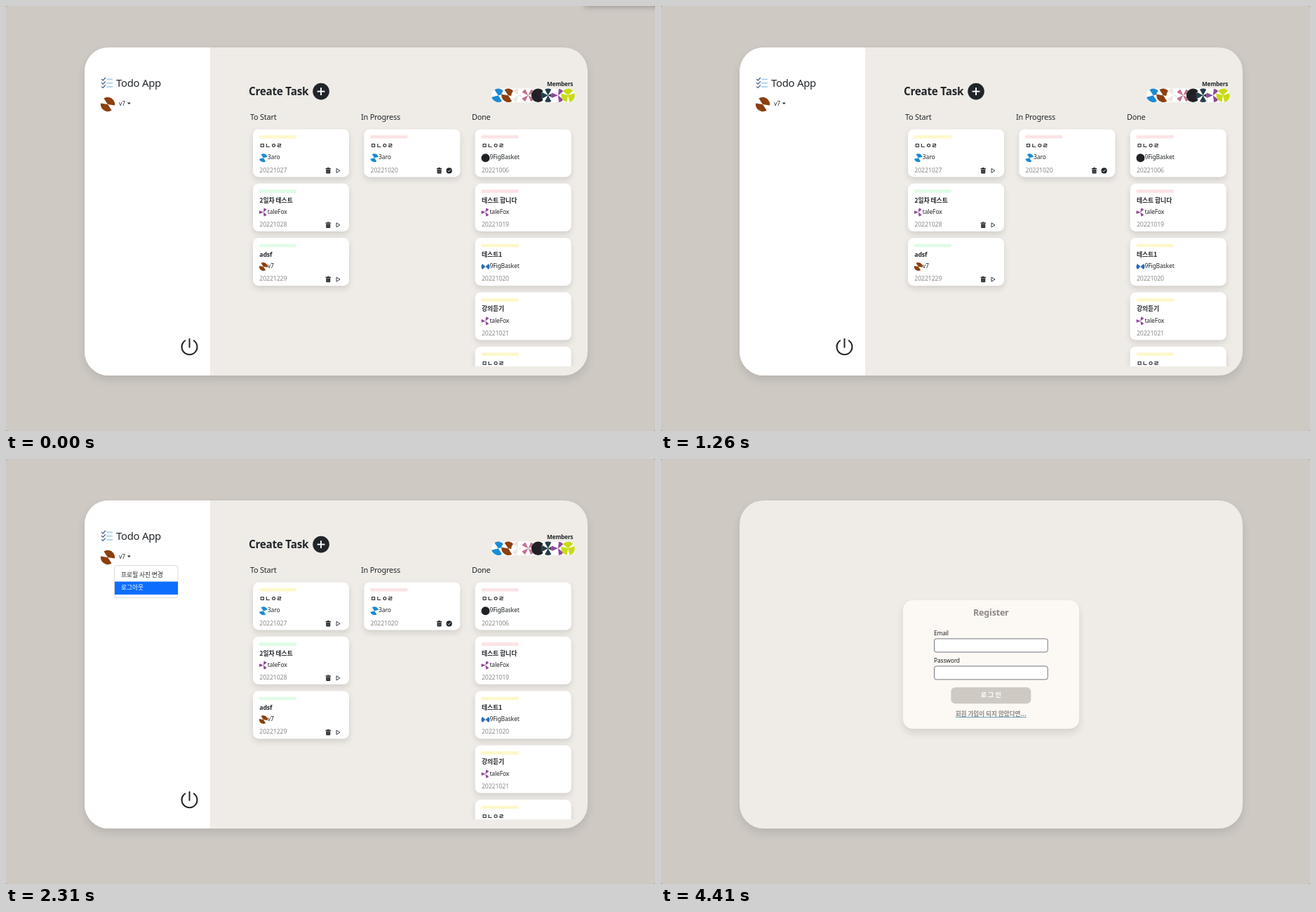
Recreate the animation shown at these times as an HTML page with a canvas. Size 925x605 px, loop 4620 ms.

```html
<!DOCTYPE html>
<html lang="ko">
<head>
<meta charset="utf-8">
<title>Todo App</title>
<style>
  html, body { margin: 0; width: 100%; height: 100%; overflow: hidden; background: #cec9c3; }
  canvas { display: block; width: 925px; height: 605px; }
</style>
</head>
<body>
<canvas id="stage" width="925" height="605"></canvas>
<script>
const ctx = document.getElementById('stage').getContext('2d');
const LOOP = 4620;
const TIMES = { shadowOff: 1260, menuOpen: 1750, hover: 2030, press: 2310, login: 2450 };
const LATIN = '"Noto Sans", "Noto Sans CJK KR", sans-serif';
const HANGUL = '"Noto Sans CJK KR", "Noto Sans", sans-serif';
const INK = '#212529', GREY = '#8c8986', STONE = '#cec9c3';
const YELLOW = '#fdf8c9', MINT = '#dffbe7', PINK = '#fce3e5';

function text(str, x, y, size, { weight = 400, color = INK, align = 'left' } = {}) {
  const korean = /[\u3131-\uD79D]/.test(str);
  ctx.font = `${weight} ${size}px ${korean ? HANGUL : LATIN}`;
  ctx.letterSpacing = korean ? '0px' : `${-0.015 * size}px`;
  ctx.textAlign = align;
  ctx.fillStyle = color;
  ctx.fillText(str, x, y);
}

function box(x, y, w, h, r, fill, stroke) {
  ctx.beginPath();
  ctx.roundRect(x, y, w, h, r);
  ctx.fillStyle = fill;
  ctx.fill();
  if (stroke) {
    ctx.strokeStyle = stroke;
    ctx.lineWidth = 1;
    ctx.stroke();
  }
}

function shadowBox(x, y, w, h, r, fill, dy, blur, alpha) {
  ctx.save();
  ctx.shadowColor = `rgba(0,0,0,${alpha})`;
  ctx.shadowOffsetY = dy;
  ctx.shadowBlur = blur;
  box(x, y, w, h, r, fill);
  ctx.restore();
}

function disc(x, y, r, fill) {
  ctx.beginPath();
  ctx.arc(x, y, r, 0, Math.PI * 2);
  ctx.fillStyle = fill;
  ctx.fill();
}

function path(points, close) {
  ctx.beginPath();
  points.forEach(([x, y]) => ctx.lineTo(x, y));
  if (close) ctx.closePath();
}

function line(points, color, width) {
  path(points);
  ctx.strokeStyle = color;
  ctx.lineWidth = width;
  ctx.stroke();
}

// Every avatar is a white disc with evenly turned coloured sectors.
const AVATARS = {
  blue: { color: '#1c8bd3', count: 2, turn: -1.2, span: 1.9 },
  brown: { color: '#8d3f0d', count: 2, turn: -1, span: 2.3 },
  pale: { color: '#ece7e4', count: 3, turn: -2, span: .8 },
  mauve: { color: '#c5708d', count: 4, turn: .8, span: .7 },
  black: { color: '#202124', count: 1, turn: 0, span: 2 * Math.PI },
  teal: { color: '#263c49', count: 4, turn: 0, span: 1 },
  purple: { color: '#91479b', count: 3, turn: Math.PI, span: .8 },
  lime: { color: '#c8db16', count: 3, turn: .5, span: 1.7 },
  bowtie: { color: '#2b6cb5', count: 2, turn: 0, span: 1.5 }
};

function avatar(kind, x, y, r) {
  const { color, count, turn, span } = AVATARS[kind];
  disc(x, y, r, '#fff');
  ctx.fillStyle = color;
  for (let i = 0; i < count; i++) {
    const angle = turn + i * 2 * Math.PI / count;
    ctx.beginPath();
    ctx.moveTo(x, y);
    ctx.arc(x, y, r, angle - span / 2, angle + span / 2);
    ctx.fill();
  }
}

function trash(x, y) {
  ctx.fillStyle = INK;
  ctx.fillRect(x - 3.7, y - 3.4, 7.4, 1.4);
  ctx.fillRect(x - 1.5, y - 4.3, 3, 1);
  box(x - 3, y - 1.5, 6, 5.7, [0, 0, 1, 1], INK);
  for (const dx of [-1, 1]) line([[x + dx, y - .8], [x + dx, y + 3.3]], '#aaa', .5);
}

function playIcon(x, y) {
  path([[x - 2.3, y - 3], [x + 2.7, y], [x - 2.3, y + 3]], true);
  ctx.strokeStyle = INK;
  ctx.lineWidth = .9;
  ctx.stroke();
}

function checkIcon(x, y) {
  disc(x, y, 4.1, INK);
  line([[x - 1.9, y], [x - .5, y + 1.5], [x + 2, y - 1.5]], '#fff', .9);
}

const USERS = { blue: '3aro', purple: 'taleFox', brown: 'v7', black: '9FigBasket', bowtie: '9FigBasket' };

const COLUMNS = [
  { title: 'To Start', action: playIcon, cards: [
    [YELLOW, 'ㅁㄴㅇㄹ', 'blue', '20221027'],
    [MINT, '2일차 테스트', 'purple', '20221028'],
    [MINT, 'adsf', 'brown', '20221229']] },
  { title: 'In Progress', action: checkIcon, cards: [
    [PINK, 'ㅁㄴㅇㄹ', 'blue', '20221020']] },
  { title: 'Done', cards: [
    [PINK, 'ㅁㄴㅇㄹ', 'black', '20221006'],
    [PINK, '테스트 합니다', 'purple', '20221019'],
    [YELLOW, '테스트1', 'bowtie', '20221020'],
    [YELLOW, '강의듣기', 'purple', '20221021'],
    [YELLOW, 'ㅁㄴㅇㄹ', 'black', '20221022']] }
];

function card(x, y, [tag, title, user, date], action) {
  shadowBox(x, y, 137, 68, 8, '#fff', 4, 9, .12);
  box(x + 9, y + 8.5, 53, 4.6, 1, tag);
  text(title, x + 9.3, y + 26.7, 8.75, { weight: 600 });
  avatar(user, x + 14.8, y + 40.8, 6);
  text(USERS[user], x + 20.8, y + 43, 8.5);
  text(date, x + 9.3, y + 61.2, 8.75, { weight: 500, color: GREY });
  if (action) {
    trash(x + 107.2, y + 58.9);
    action(x + 121.3, y + 59);
  }
}

function background(t) {
  ctx.fillStyle = '#77736f';
  ctx.fillRect(0, 0, 925, 605);
  box(0, 0, 925, 605, 2, STONE);
  if (t < TIMES.shadowOff) shadowBox(824, -20, 120, 19, 4, STONE, 2, 8, .28);
  shadowBox(112, 59, 717, 467, 34, '#efece7', 6, 13, .11);
}

function power(x, y) {
  ctx.beginPath();
  ctx.arc(x, y, 11, -Math.PI * .31, Math.PI * 1.31);
  ctx.strokeStyle = INK;
  ctx.lineWidth = 2;
  ctx.lineCap = 'round';
  ctx.stroke();
  line([[x, y - 11.3], [x, y + .5]], INK, 2);
  ctx.lineCap = 'butt';
}

function sidebar() {
  box(112, 59, 179, 467, [34, 0, 0, 34], '#fff');
  for (let i = 0; i < 3; i++) {
    const y = 104 + i * 5.3;
    line([[136, y], [138.2, y + 1.9], [141.8, y - 2]], '#3c5488', 1.2);
    line([[143.3, y + .4], [152, y + .4]], '#a9d1ee', 1.8);
  }
  text('Todo App', 157, 115, 14.8);
  avatar('brown', 145, 140, 10.2);
  text('v7', 161, 142, 8.4, { weight: 500 });
  path([[172.7, 137.5], [177.9, 137.5], [175.3, 140.1]]);
  ctx.fill();
  power(261.5, 485.3);
}

function members() {
  text('Members', 771, 113.5, 8.15, { weight: 700 });
  box(692, 117.5, 119, 19.5, 9.7, '#fff');
  ['blue', 'brown', 'pale', 'mauve', 'black', 'teal', 'purple', 'lime']
    .forEach((kind, i) => avatar(kind, 701.6 + i * 14.2, 127.3, 9.7));
}

function board() {
  sidebar();
  text('Create Task', 346, 127, 15.2, { weight: 700 });
  disc(449, 121.6, 11.8, INK);
  line([[443.6, 121.6], [454.4, 121.6]], '#fff', 1.9);
  line([[449, 116.2], [449, 127]], '#fff', 1.9);
  members();
  COLUMNS.forEach(({ title, cards, action }, column) => {
    const x = 352 + column * 158.3;
    text(title, 348 + column * 158, 161.7, 10.8, { weight: 500 });
    ctx.save();
    ctx.beginPath();
    ctx.rect(x - 12, 165, 161, 348);
    ctx.clip();
    cards.forEach((data, i) => card(x, 175.4 + i * 77.4, data, action));
    ctx.restore();
  });
}

function menu(t) {
  const pressed = t >= TIMES.press;
  box(154.5, 151.5, 90.5, 46, 3.5, '#fff', '#dadada');
  if (t >= TIMES.hover) {
    ctx.fillStyle = pressed ? '#0d6efd' : '#e9ecef';
    ctx.fillRect(155, 174.5, 90, 18.5);
  }
  text('프로필 사진 변경', 164, 167.6, 8.7);
  text('로그아웃', 164, 185.7, 8.7, pressed ? { weight: 500, color: '#fff' } : {});
}

function login() {
  const centered = color => ({ weight: 700, color, align: 'center' });
  shadowBox(345, 201, 251, 183, 14, '#fcf8f4', 6, 11, .11);
  text('Register', 470.3, 223, 12.5, centered(GREY));
  ['Email', 'Password'].forEach((label, i) => {
    const y = 251 + i * 39;
    text(label, 389, y, 8.4);
    box(389.5, y + 4.9, 161.7, 19, 3, '#fff', '#757580');
  });
  box(413.3, 325, 114, 23.3, 6, STONE);
  text('로 그 인', 470.3, 339, 9.1, centered('#fff'));
  text('회원 가입이 되지 않았다면...', 470.3, 366.3, 8.6, centered(GREY));
  line([[420, 367.6], [520.5, 367.6]], '#5f9dbd', 1);
}

function draw(t) {
  background(t);
  if (t >= TIMES.login) return login();
  board();
  if (t >= TIMES.menuOpen) menu(t);
}

const start = performance.now();
function tick() {
  draw((performance.now() - start) % LOOP);
  requestAnimationFrame(tick);
}
tick();
</script>
</body>
</html>
```
